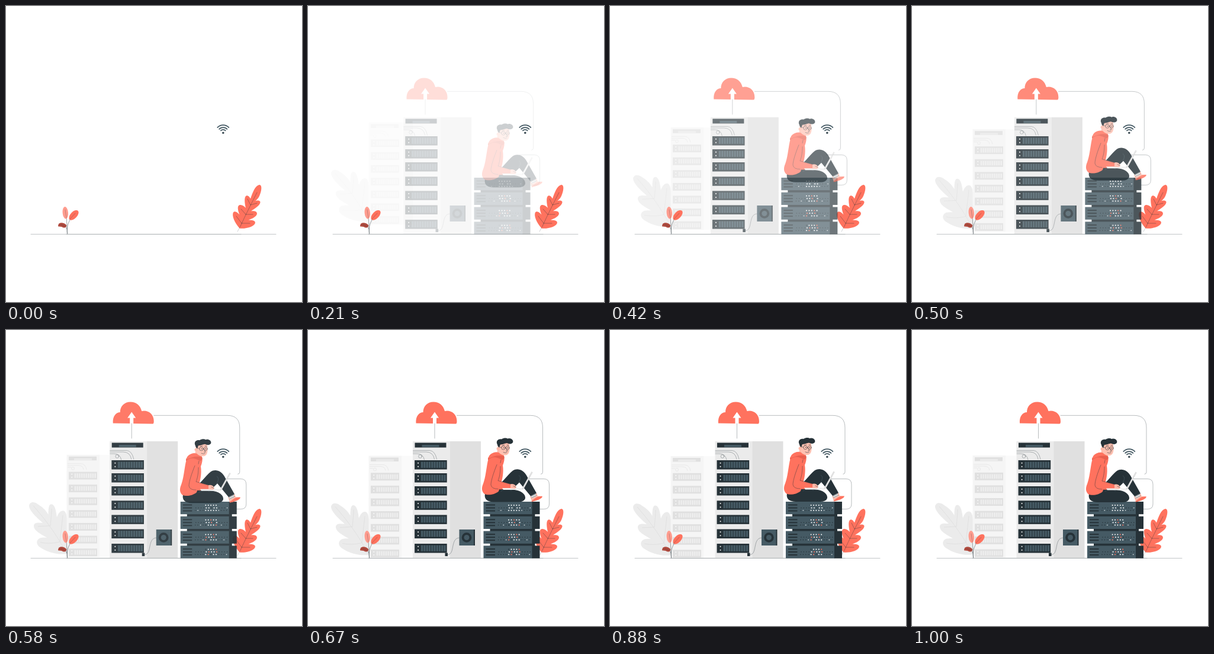
An HTML page for the animation above (1040 ms loop, 500 by 500 pixels).

```html
<!DOCTYPE html>
<html lang="en">
<head>
<meta charset="utf-8">
<title>Server room</title>
<style>
html, body { margin: 0; width: 100%; height: 100%; overflow: hidden; background: #fff; }
svg { display: block; width: 100vw; height: 100vh; }
.line { fill: none; stroke: #263238; stroke-width: .55; stroke-linecap: round; }
</style>
</head>
<body>
<svg viewBox="0 0 500 500" xmlns="http://www.w3.org/2000/svg">
  <g id="back">
    <path fill="#ebebeb" d="M103 379C90 382 70 377 57 368C50 363 51 355 58 352.500C62 351.500 66 352 69 352C59 346 46 340 47 331C49 325 57 327 62 327C54 320 39 307 39 298C40 291 48 291 53 295C61 300 67 305 71.500 313C71.500 304 72 296 76 295.500C83 295 85 309 86 317.500C88 311 92 306 97 306.500C103 308 103 320 104 330Z"/>
    <path fill="none" stroke="#dcdcdc" stroke-width=".7" d="M46 298C65 320 85 345 104 382M75 332C76 320 77 310 77 303M75 332L54 333M91 359C93 340 95 325 96 314M91 359C80 362 68 362 58 360"/>
    <path fill="#fafafa" d="M155 212H177V385H155Z"/>
    <path fill="#f5f5f5" d="M102.500 212H158V385H102.500Z"/>
    <path fill="#e0e0e0" d="M106 215H153V221.500H106Z"/>
    <path fill="#ebebeb" d="M115 218H145V221H115Z"/>
    <path fill="none" stroke="#e0e0e0" stroke-width=".6" d="M104 227H126Q134 227 136 237M104 230H122Q130 230 131 237M104 233H110"/>
    <circle cx="113" cy="235" r="2.500" fill="none" stroke="#e0e0e0" stroke-width=".6"/>
    <g id="paleSlots"></g>
  </g>

  <path class="line" stroke-opacity=".5" d="M42 385.500H456"/>
  <path class="line" stroke-opacity=".3" d="M102 385.500H397"/>

  <path fill="#ff725e" d="M394.500 375.500C386 366 381 354 384 348.500C387 345.500 391 349 394.500 352.500C391.500 345 390 337 395 336C399 335.500 402 338 405 341C403 333 402 322 406 320.500C409 319.500 411.500 323 413 325.500C416 316 421 303 428 302C433 302 432 312 428 321C426 325 424 327 421 329.500C426 327.500 430 329 429.500 332C428 338 420 342 414 346.500C419 346 424 346.500 424 351C423 356 416 359 409.500 361.500C414 361.500 421 362 421 366C420 373 404 377 394.500 375.500Z"/>
  <path class="line" stroke-opacity=".7" d="M396 372C404 354 414 335 424 315M398 367L389 355M398 367H412M405 352L397 343M405 352H417M413 336L408 326M413 336L424 333"/>
  <path class="line" stroke-opacity=".4" d="M391 381L396 372"/>

  <g id="servers">
    <path fill="#e0e0e0" d="M239 188H291.500V385H239Z"/>
    <path fill="#ebebeb" d="M176.500 188H239.500V385H176.500Z"/>
    <path fill="#263238" d="M180 190.500H233V198.500H180Z"/>
    <path fill="#455a64" d="M192 194H221V197.800H192Z"/>
    <g class="line" stroke-opacity=".6">
      <path d="M177 203.500H205Q214 204 217 218M177 206H199Q211 206 213 218M177 209H184Q194 209 196 219"/>
      <circle cx="189" cy="213.500" r="2.800"/>
      <path d="M235 379.500C243 380 243 370 245 362C247 354 250 351 256 351"/>
    </g>
    <g id="slots"></g>
    <path fill="#263238" d="M231 376.500H235.500V382H231Z"/>
    <path fill="#455a64" d="M255 337H280V364H255Z"/>
    <path fill="#263238" d="M279.500 337H281.500V364H279.500Z"/>
    <circle cx="267.500" cy="350.500" r="8.300" fill="#263238"/>
    <circle cx="267.500" cy="350.500" r="4.500" fill="#455a64"/>

    <path fill="#ff725e" d="M182 157.500C181 146 187 139 194 139C194 129 201 121.500 211.500 121.500C221 121.500 228 127 230.500 137C240 134.500 251 141 251 154Q251 158.500 249 158.500Z"/>
    <path fill="#fff" d="M213.500 138.500L220.500 148.500H216.500V159H210.500V148.500H206.500Z"/>
    <path class="line" stroke-opacity=".6" d="M213.500 158V183M251 144.300H375Q396 144.300 396 165V240Q396 243 393 243.500M372 251.500H398Q407 251.500 407 261V294Q407 302.500 398 302.500H390"/>
    <g id="rack"></g>
  </g>

  <g id="man">
    <path fill="#ffb9a8" d="M375 281L386 276L388 281C392 281 396 282 395 284C391 287 386 289 378 290Z"/>
    <path fill="#ff725e" d="M377.500 289.500L384 284.500C388 281.500 392 281 396 281.500C395 285.500 387 288.500 378 290.500Z"/>
    <path fill="#ebebeb" d="M375 279L384 275L386 281L378 285Z"/>
    <path class="line" d="M376.500 281.500L385 277.500M377.500 284L386 280"/>
    <path fill="#263238" d="M313 269C326 262 337 245 346 238C354 233 364 237 369 246L386 276L376 281L357 258C350 266 340 271 334 274Z"/>
    <path fill="#263238" d="M299 277C303 267 326 267 345 270C360 271 368 278 367 285Q365 291 355 291H314C303 291 297 286 299 277Z"/>
    <path fill="none" stroke="#455a64" stroke-width=".6" d="M344 272C338 268 332 268 326 273M356 258C360 251 359 248 356 246"/>
    <path fill="#ff725e" d="M306 213C311 206 321 206 329 211C333 215 332 222 329 229C331 242 328 254 325 263L322 273C315 279 304 280 298 277.500C293 273 293 267 296 260C300 249 301 236 303.500 223Z"/>
    <path fill="#ffb9a8" d="M320 203L331 207V213Q326 217 319 211Z"/>
    <path fill="#e85f4e" d="M304 217C311 209 321 207 331 213C333 217 330 221 326 219C317 214 311 214 304 220Z"/>
    <path fill="#ff725e" d="M304.500 216C312 206 318 205 325 209L331 214C323 211 315 213 304 218Z"/>
    <path fill="#ff725e" d="M311 225C318 220 326 225 326 234C325 244 323 250 321 255L343 261L342 268C330 271 314 270 309 266C306 261 308 236 311 225Z"/>
    <path class="line" stroke-opacity=".8" d="M325 231C325 243 323 250 321 255L342 261M319 228C314 240 309 255 309 262Q310 269 321 269M326 220L325 225"/>
    <path fill="#ffc0b0" d="M320.500 193C324 188 339 188 340 194C341.500 204 340 212 333 212C325 212 321.500 208 320.500 201Z"/>
    <circle cx="321" cy="201" r="2.500" fill="#ffb9a8"/>
    <path fill="#263238" d="M319 192C318 187 322 184 327 185C331 182 336 183 337 184C342 182 348 186 346 190.500C344 194 339 193 336 191.500C331 192.500 328 194 325 194L323 199L321 197C320 195 320 194 319 192Z"/>
    <g class="line">
      <circle cx="330" cy="199.500" r="3.200"/>
      <circle cx="337.300" cy="199.500" r="2.900"/>
      <path d="M326.800 199L322 198M333.200 199.500H334.400M335 201L337 205L334.500 205M330 207Q333 209 336 207.500M328 195.500L332 194.500M336 194.500L339 195"/>
    </g>
    <circle cx="330.500" cy="199.500" r=".7" fill="#263238"/>
    <circle cx="337.300" cy="199.500" r=".7" fill="#263238"/>
    <path fill="#f0f0f0" d="M328 267.500H362L364 270.500H330Z"/>
    <path fill="#e0e0e0" d="M377.500 239.500L379.800 241L364 269.500L361 269Z"/>
    <path fill="#ffb9a8" d="M342 261C347 259 351 263 352 266L350 268.500L342 268Z"/>
    <path class="line" d="M347 264L351 266"/>
  </g>

  <g id="plant">
    <path class="line" stroke-opacity=".8" d="M103.500 385C103 374 103 364 101 348M103.500 384C102 373 105 363 115 352M103 377Q102 372 95 370"/>
    <ellipse cx="100.300" cy="349.300" rx="4.700" ry="10.300" transform="rotate(-5 100.300 349.300)" fill="#ff9c8e"/>
    <ellipse cx="114.500" cy="353.300" rx="5.600" ry="10.200" transform="rotate(43 114.500 353.300)" fill="#ff725e"/>
    <path fill="#b04a3e" d="M89 368C92 365 99 366 102 370C103 374 98 376 95 373.500C92 372 88 374 88 371Z"/>
    <path class="line" stroke-opacity=".5" d="M102 358L100 344M107 361L117 350M92 369L100 372"/>
  </g>

  <g fill="none" stroke="#455a64" stroke-width="1.800" stroke-linecap="round" id="wifi">
    <circle cx="366.800" cy="214.300" r="1.700" fill="#37474f" stroke="none"/>
  </g>
</svg>

<script>
const $ = id => document.getElementById(id);
const rect = (x, y, w, h, fill) =>
  `<rect x="${x}" y="${y}" width="${w}" height="${h}" fill="${fill}"/>`;
const dot = (x, y, r, fill) => `<circle cx="${x}" cy="${y}" r="${r}" fill="${fill}"/>`;
const range = n => [...Array(n).keys()];
const add = (id, parts) => $(id).innerHTML += parts.join('');

// A drive bay: frame, two lamps, a row of bars
function slot(x, y, w, h, frame, bar, lamp) {
  const lead = w * 0.2, pitch = (w - lead - 1) / 10;
  return rect(x, y, w, h, frame)
    + range(10).map(i => rect(x + lead + i * pitch, y + 2.7, pitch - 1, h - 5.4, bar)).join('')
    + dot(x + w * .11, y + h * .3, 1, lamp)
    + dot(x + w * .11, y + h * .7, 1, lamp);
}

add('paleSlots', range(7).map(i =>
  slot(106, 240.8 + i * 21.6, 48, 13, '#e0e0e0', '#ededed', '#fafafa')));
add('slots', [220, 242, 264, 288.3, 312.4, 336.5, 361].map(y =>
  slot(179.6, y, 54.6, 15.5, '#263238', '#455a64', '#fff')));

function unit(i) {
  const y = 290 + i * 24.8, parts = [];
  if (i < 3) parts.push(rect(307, y + 20, 76, 6, '#263238'));
  parts.push(rect(296, y, 83, 21.2, '#455a64'), rect(378, y, 13, 21.2, '#263238'));
  for (const d of [4.5, 9.5, 14.5]) parts.push(rect(300, y + d, 15.5, 2, '#263238'));
  for (const c of range(13)) {
    const x = 321 + c * 4.4, mid = c > 3 && c < 9;
    for (const r of range(3)) {
      if (!mid && r === 0) continue;
      const k = (c * 5 + r * 7 + i * 3) % 8;
      const fill = mid ? (k < 2 && i ? '#ff725e' : k === 5 ? '#263238' : '#fff')
        : k === 3 ? '#fff' : '#263238';
      parts.push(dot(x + (r % 2 ? 1 : 0), y + 6 + r * 4.4, mid ? 1 : .75, fill));
    }
  }
  return parts.join('');
}
add('rack', range(4).map(unit));

add('wifi', [[13.2, 46], [9.2, 46], [5.4, 45]].map(([r, deg]) => {
  const a = deg * Math.PI / 180, dx = r * Math.sin(a), y = 214.3 - r * Math.cos(a);
  return `<path d="M${366.8 - dx} ${y}A${r} ${r} 0 0 1 ${366.8 + dx} ${y}"/>`;
}));

const LOOP = 1040, LEAD = 40, SLIDE = 20;
const bez = (s, a, b) => 3 * (1 - s) ** 2 * s * a + 3 * (1 - s) * s * s * b + s ** 3;

// cubic-bezier(.36, -.01, .5, 1.38)
function ease(x) {
  if (x >= 1) return 1;
  let lo = 0, hi = 1;
  for (let i = 0; i < 24; i++) {
    const m = (lo + hi) / 2;
    if (bez(m, .36, .5) < x) lo = m; else hi = m;
  }
  return bez(lo, -.01, 1.38);
}

function place(id, dx, dy, alpha) {
  $(id).setAttribute('transform', `translate(${dx} ${dy})`);
  $(id).setAttribute('opacity', alpha);
}

const start = performance.now();
function draw(now) {
  const t = Math.max(0, now - start) % LOOP;
  const p = ease((t + LEAD) / 1000);
  const off = (1 - p) * SLIDE;
  const alpha = p < .01 ? 0 : Math.min(1, p);
  place('servers', -off, 0, alpha);
  place('back', 0, -off, alpha);
  place('man', 0, off, alpha);
  requestAnimationFrame(draw);
}
draw(start);
</script>
</body>
</html>
```
